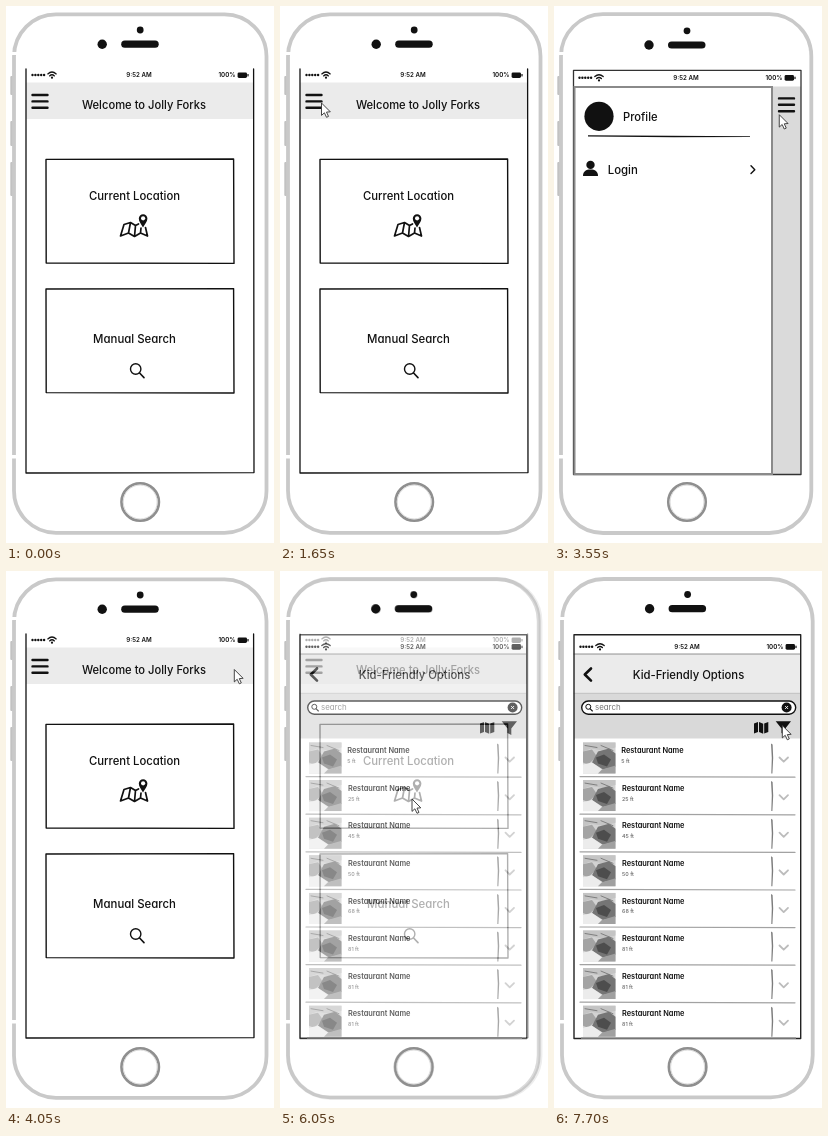
Animation, 268 px wide and 537 px high, one loop 8000 ms. Source, as an HTML page:

```html
<!DOCTYPE html>
<html lang="en">
<head>
<meta charset="utf-8">
<title>Phone wireframe walkthrough</title>
<style>
  html, body { margin: 0; width: 100%; height: 100%; overflow: hidden; background: #fff; }
  svg { display: block; width: 100vw; height: 100vh; }
  text { font-family: Inter, Lato, sans-serif; font-weight: 500; font-feature-settings: "cv11"; fill: #111; }
  .line { fill: none; stroke: #111; stroke-linecap: round; stroke-linejoin: round; }
</style>
</head>
<body>
<svg id="stage" viewBox="0 0 268 537" xmlns="http://www.w3.org/2000/svg"></svg>
<script>
const LOOP = 8000, STEP = 50;

const rect = (x, y, w, h, fill, more = '') =>
  `<rect x="${x}" y="${y}" width="${w}" height="${h}" fill="${fill}" ${more}/>`;
const disc = (x, y, r, fill = '#111', more = '') =>
  `<circle cx="${x}" cy="${y}" r="${r}" fill="${fill}" ${more}/>`;
const line = (d, w = 1.3, color = '#111') =>
  `<path class="line" d="${d}" style="stroke:${color};stroke-width:${w}"/>`;
const shape = (d, fill = '#111') => `<path d="${d}" fill="${fill}"/>`;
const text = (s, x, y, size, anchor = 'start', style = '') =>
  `<text x="${x}" y="${y}" font-size="${size}" text-anchor="${anchor}" style="${style}">${s}</text>`;
const at = (x, y, body) => `<g transform="translate(${x} ${y})">${body}</g>`;

function phone(left, right, top, bottom, mid, lensY) {
  const w = right - left;
  const button = (y, h) => rect(left - 3.7, y, 3, h, '#c2c2c2', 'rx="1"');
  return rect(0, 0, 268, 537, '#fff')
    + button(70, 19) + button(115, 25) + button(156, 34)
    + rect(left, top, w, bottom - top, '#fff', 'rx="42" stroke="#c9c9c9" stroke-width="3.8"')
    + rect(left - 3, 46, 6, 3, '#fff') + rect(left - 3, 449, 6, 3.5, '#fff')
    + disc(mid, lensY - 14.2, 3.4) + disc(mid - 38, lensY, 4.7)
    + rect(mid - 19, lensY - 3.6, 37.5, 7.2, '#111', 'rx="3.6"')
    + disc(mid, 496, 18.7, '#fff', 'stroke="#8f8f8f" stroke-width="2.7"')
    + disc(mid, 496, 17, 'none', 'stroke="#d8d8d8" stroke-width="1"');
}

function statusBar(x, y) {
  const bold = 'font-weight:600';
  let out = '';
  for (let i = 0; i < 5; i++) out += disc(x + 1.5 + i * 2.9, y, 1.2);
  const wifi = line('M-4.2 -1.6Q0 -5.4 4.2 -1.6M-2.4 .4Q0 -1.8 2.4 .4', 1.3) + disc(0, 2.2, 1.1);
  return out + at(x + 21, y + .5, wifi)
    + text('9:52 AM', x + 108, y + 2.3, 6.2, 'middle', bold)
    + text('100%', x + 204.5, y + 2.3, 6.2, 'end', bold)
    + rect(x + 206.6, y - 2.6, 9.4, 5.6, '#111', 'rx="1.4"')
    + rect(x + 216.4, y - 1, 1.2, 2.4, '#111');
}

const burger = (x, y) => line(`M${x} ${y}h15M${x} ${y + 6.4}h15M${x} ${y + 12.8}h15`, 2.4);

function home() {
  const card = y => line(`M40 ${y + .4}L227.6 ${y}L228 ${y + 104.4}L40.2 ${y + 104}Z`, 1.4);
  const map = line('M3.5 11L0 22.5L8 19.5L14 23L20 19.5L27 22.5L25 14M3.5 11L10 9L15 12L18 10.5M10 9L8 19.5M15 12L14 23M20.5 14.5L20 19.5', 1.7)
    + shape('M22.5 14C20.5 10.5 18.3 8 18.3 5A4.3 4.3 0 0 1 26.9 5C26.9 8 24.5 10.5 22.5 14Z')
    + disc(22.6, 4.8, 2.1, '#fff');
  return phone(8, 260.5, 8.3, 526.8, 134.2, 38.2)
    + rect(20, 76.5, 228, 36.5, '#ebebeb')
    + statusBar(25, 69)
    + line('M20 63L20 467L248 466.6L247.6 63', 1.3)
    + burger(26.5, 89)
    + text('Welcome to Jolly Forks', 138, 103.3, 11.2, 'middle')
    + card(153) + card(282.6)
    + text('Current Location', 128.5, 194.2, 11.3, 'middle')
    + at(114.5, 207.5, map)
    + text('Manual Search', 128.5, 337.2, 11.4, 'middle')
    + disc(129.7, 363, 5.2, 'none', 'stroke="#111" stroke-width="1.4"')
    + line('M133.6 367L138 371.6', 1.6);
}

function menu() {
  return phone(7, 257.3, 8.2, 527, 133, 39)
    + rect(218, 80.5, 29, 388, '#dadada')
    + line('M19.5 64.3V468.5H247V64.3Z', 1.3, '#333')
    + rect(20.5, 81, 197.5, 387, '#fff', 'stroke="#8a8a8a" stroke-width="2"')
    + statusBar(24, 71.7)
    + burger(225, 92.4)
    + disc(45, 110.3, 14.6)
    + text('Profile', 69, 115.4, 11.2)
    + shape('M34 129.3L196 130.2L196 130.9L120 131.2L34 130.4Z')
    + disc(36.5, 158.9, 4.2)
    + shape('M29 170C29 165.5 32 163.6 36.5 163.6S44 165.5 44 170Z')
    + text('Login', 53.7, 168, 11.4)
    + line('M197 159.8L200.8 163.7L197 167.6', 1.4);
}

function thumbnail() {
  return rect(0, 0, 32.5, 31, '#d2d2d2')
    + shape('M0 0H32.5V5L20 8L8 6L0 9Z', '#c4c4c4')
    + shape('M0 9L9 7L14 14L5 22L0 20Z', '#a4a4a4')
    + shape('M15 9L26 6L32.5 11V24L20 27L9 20Z', '#757575')
    + shape('M13 15L21 12L28 17L24 24L15 21Z', '#4d4d4d')
    + shape('M0 22L9 20L19 27L15 31H0Z', '#ececec')
    + shape('M19 27L32.5 23V31H15Z', '#a0a0a0')
    + line('M2 3L14 5M18 3L30 8', .9, '#777');
}

function list() {
  const rows = [5, 25, 45, 50, 68, 81, 81, 81].map((feet, i) => at(0, 169 + i * 37.6,
    at(29, 2.5, thumbnail())
    + text('Restaurant Name', i ? 68 : 67.2, 13.2, 7.4, 'start', 'font-weight:600')
    + text(feet + ' ft', i ? 68 : 67.2, 23, 5.4, 'start', 'fill:#666')
    + shape('M217 3.5L218.6 4.5L219.2 18L218.4 33.5L217.3 33.5L217.8 18Z', '#7c7c7c')
    + line('M225.5 17.5L229.7 21.7L234 17.5', 1.8, '#bcbcbc')
    + (i < 7 ? line('M26 36.6L241 37.2', 1.2, '#a2a2a2') : '')
  )).join('');
  return phone(8, 258.7, 8, 526.3, 133.6, 37.7)
    + rect(20, 83, 226.5, 39, '#ebebeb')
    + rect(20, 122, 226.5, 45.5, '#d9d9d9')
    + line('M20 83H246.5', .8, '#777') + line('M20 122.3H246.5', .8, '#bbb')
    + statusBar(25, 75.7)
    + line('M37 97.5L30.8 103.5L37 109.6', 2.6)
    + text('Kid-Friendly Options', 134.5, 108, 11.3, 'middle')
    + rect(27.7, 130, 214, 13.2, '#fff', 'rx="6.6" stroke="#111" stroke-width="1.4"')
    + disc(34.3, 135.8, 2.5, 'none', 'stroke="#111" stroke-width="1"')
    + line('M36.2 137.8L38.4 140', 1.1)
    + text('search', 41, 139, 7.9, 'start', 'fill:#777;font-weight:400')
    + disc(232.6, 136.5, 5) + line('M231.5 135.4L233.7 137.6M233.7 135.4L231.5 137.6', 1, '#fff')
    + shape('M200 152.5L204 151V161L200 162.5ZM205 151L209.2 152.7V162.7L205 161ZM210.2 152.5L214.3 151V161L210.2 162.5Z')
    + shape('M221.7 150.2H237L231.3 157.5V164L227.5 162V157.5Z')
    + rows
    + line('M20 63.8H246.7V467.5H20Z', 1.4, '#222')
    + rect(27, 466.2, 215, 1.5, '#999');
}

const stage = document.getElementById('stage');
const arrow = '<path d="M0 0V12.4L2.9 9.8L5 14.3L7 13.4L5 9.1L8.8 8.8Z" fill="#fff" stroke="#333" stroke-width=".9" stroke-linejoin="round"/>';
stage.innerHTML = `<g id="home">${home()}</g><g id="menu">${menu()}</g>`
  + `<g id="list">${list()}</g><g id="cursor">${arrow}</g>`;
const [homeView, menuView, listView, cursor] = stage.children;

const brisk = p => 1 - (1 - p) ** 1.6;
const soft = p => p * p * (3 - 2 * p);

// start, end, bend x, bend y, end x, end y, easing
const MOVES = [
  [350, 400, 209, 148, 190, 151, brisk],
  [550, 800, 140, 146, 93, 132, brisk],
  [950, 1450, 62, 116, 41, 97.5, brisk],
  [1600, 1650, 41.3, 97, 41.5, 97, brisk],
  [2750, 3600, 140, 193, 227, 107, soft],
  [3600, 3800, 227, 102, 228.3, 98.5, brisk],
  [4200, 5050, 120, 145, 109, 198, soft],
  [5050, 5600, 122, 213, 132, 228, brisk],
  [6850, 7700, 230, 225, 228.3, 154.5, brisk]
];

function pointer(t) {
  let x = 228, y = 145;
  for (const [t0, t1, bx, by, ex, ey, ease] of MOVES) {
    if (t <= t0) break;
    const k = ease(Math.min(1, (t - t0) / (t1 - t0))), q = 1 - k;
    x = q * q * x + 2 * q * k * bx + k * k * ex;
    y = q * q * y + 2 * q * k * by + k * k * ey;
  }
  return [x, y];
}

const show = (el, on) => { el.style.display = on ? '' : 'none'; };

function draw(now) {
  const t = Math.floor((now % LOOP) / STEP) * STEP;
  show(homeView, t < 2050 || (t >= 4050 && t < 6100));
  show(menuView, t >= 2050 && t < 4050);
  show(listView, t >= 6000);
  listView.style.opacity = Math.min(1, (t - 5950) / 150);
  show(cursor, t >= 350);
  const [x, y] = pointer(t);
  cursor.setAttribute('transform', `translate(${x.toFixed(2)} ${y.toFixed(2)})`);
}

const start = performance.now();
function tick() {
  draw(performance.now() - start);
  requestAnimationFrame(tick);
}
tick();
</script>
</body>
</html>
```
